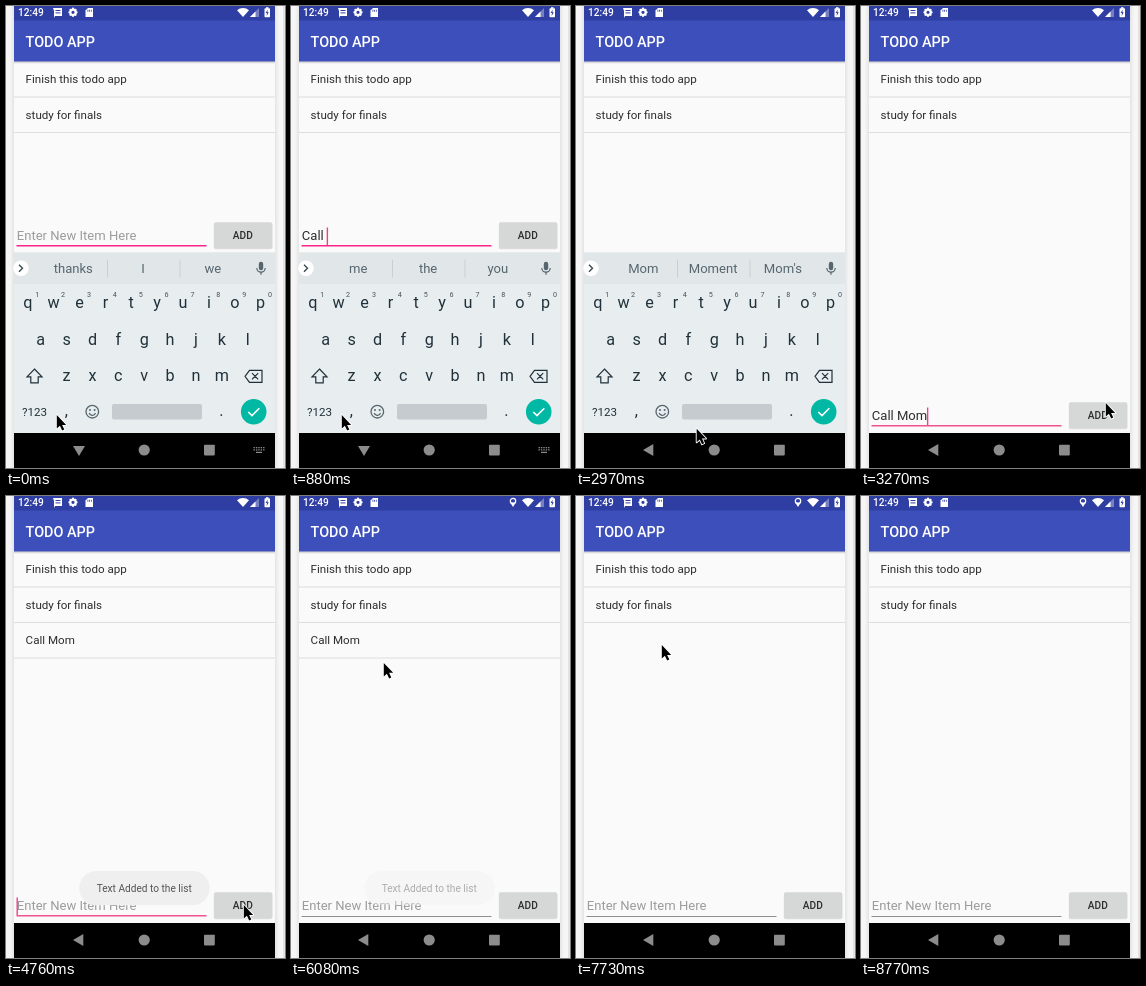
These frames come from a looping animation (279x462 px, 9.3 s). An HTML page with a canvas:

```html
<!DOCTYPE html>
<html lang="en">
<head>
<meta charset="utf-8">
<title>Todo app</title>
<style>
html, body { margin: 0; width: 100%; height: 100%; overflow: hidden; background: #f5f5f5; }
canvas { display: block; width: 279px; height: 462px; }
</style>
</head>
<body>
<canvas id="stage"></canvas>
<script>
const W = 279, H = 462, LOOP = 9300;
const LEFT = 8, WIDE = 261, MID = 138.2;
const TICK = 148.6;

// Moments in the story, in ms
const TYPE = 150, TYPE_MORE = 1330, TYPED = 1480, TO_BACK = 2080, BACK = 2820,
  HIDDEN = 3270, TO_ADD = 3720, ADD = 4460, LEAVE = 5050, RETURN = 5940,
  REST = 6080, HOLD = 7280, REMOVE = 7730, EXIT = 8020, GONE = 8770;
const PHRASE = 'Call Mom', HINT = 'Enter New Item Here';

const canvas = document.getElementById('stage');
const ratio = window.devicePixelRatio || 1;
canvas.width = W * ratio;
canvas.height = H * ratio;
const ctx = canvas.getContext('2d');
ctx.scale(ratio, ratio);

const within = (t, a, b) => t >= a && t < b;
const clamp = v => Math.min(1, Math.max(0, v));
const mix = (a, b, p) => a + (b - a) * p;
const ease = p => p * p * (3 - 2 * p);

function snap(t) {
  const k = Math.floor((t + 11) / TICK);
  return k * TICK;
}
const reached = (t, moment) => t >= moment - 15;

function rect(x, y, w, h, color, r = 0) {
  ctx.fillStyle = color;
  ctx.beginPath();
  ctx.roundRect(x, y, w, h, r);
  ctx.fill();
}
function disc(x, y, r, color) {
  ctx.fillStyle = color;
  ctx.beginPath();
  ctx.arc(x, y, r, 0, 7);
  ctx.fill();
}
function ring(x, y, r, color, width, from = 0, to = 7) {
  ctx.beginPath();
  ctx.arc(x, y, r, from, to);
  ctx.strokeStyle = color;
  ctx.lineWidth = width;
  ctx.stroke();
}
function fillPath(d, x, y, color) {
  ctx.save();
  ctx.translate(x, y);
  ctx.fillStyle = color;
  ctx.fill(new Path2D(d));
  ctx.restore();
}
function strokePath(d, x, y, color, width) {
  ctx.save();
  ctx.translate(x, y);
  ctx.strokeStyle = color;
  ctx.lineWidth = width;
  ctx.stroke(new Path2D(d));
  ctx.restore();
}
function text(str, x, y, size, color, align = 'left', weight = 400) {
  ctx.font = `${weight} ${size}px Roboto, sans-serif`;
  ctx.textAlign = align;
  ctx.fillStyle = color;
  ctx.fillText(str, x, y);
}
function fade(x0, y0, x1, y1, a, b) {
  const g = ctx.createLinearGradient(x0, y0, x1, y1);
  g.addColorStop(0, a);
  g.addColorStop(1, b);
  return g;
}

// One letter per step: the first word and its space, then the second word.
function typedText(t) {
  if (reached(t, ADD)) return '';
  if (reached(t, TYPED)) return PHRASE;
  if (reached(t, TYPE_MORE)) return PHRASE.slice(0, 7);
  return PHRASE.slice(0, Math.min(5, Math.round(t / TICK)));
}
function suggestions(t) {
  const word = typedText(t).split(' ').pop();
  if (reached(t, TYPED)) return ['Mom', 'Moment', "Mom's"];
  if (word === 'Call') return ['Call', 'Called', 'Calls'];
  if (word) return [word, word[0] === 'C' ? 'Call' : 'Mom', word[0] === 'C' ? 'Can' : 'More'];
  return reached(t, 880) ? ['me', 'the', 'you'] : ['thanks', 'I', 'we'];
}

// Blinks every half second, counted from the latest edit.
function caretOn(t) {
  if (!reached(t, TYPE) || reached(t, RETURN)) return false;
  if (!reached(t, TYPED)) return true;
  const since = [ADD, HIDDEN - 30, TYPED].find(m => reached(t, m));
  return Math.floor((t - since + 15) / 500) % 2 === 0;
}

function pointer(t) {
  const go = (from, to, a, b) => {
    const p = ease(clamp((t - a) / (b - a)));
    return [mix(from[0], to[0], p), mix(from[1], to[1], p)];
  };
  const start = [50, 408], back = [70, 432], add = [244, 396], press = [237, 408], item = [85, 148];
  if (t < BACK - 15) return go(start, back, TO_BACK, BACK - 150);
  if (t < TO_ADD) return go(back, add, BACK, HIDDEN - 20);
  if (t < LEAVE) return go(add, press, TO_ADD + 150, ADD - 150);
  if (t < 5490) return go(press, [256, 462], LEAVE, 5490);
  if (!reached(t, RETURN)) return null;
  if (t < HOLD) return go([92, 166], item, RETURN, REST - 15);
  return reached(t, GONE) ? null : go(item, [214, 462], EXIT, GONE);
}

function drawStatus(t) {
  const blue = '#2f3ea2', white = '#fff';
  rect(LEFT, 0, WIDE, 15, blue);
  text('12:49', 12, 10.3, 10.15, white, 'left', 500);
  // message
  fillPath('M0 0H9V8H2V10L1 8V3Z', 47, 2, white);
  rect(49.5, 4, 5, 1, blue);
  rect(49.5, 6.4, 5, 1, blue);
  // gear
  for (let i = 0; i < 8; i++) {
    const a = i * Math.PI / 4;
    disc(67 + 3.6 * Math.cos(a), 6.3 + 3.6 * Math.sin(a), 1.1, white);
  }
  ring(67, 6.3, 2.7, white, 2.2);
  // memory card
  fillPath('M2.5 0H7.5V9H0V2.5Z', 79.5, 2, white);
  for (let i = 0; i < 3; i++) rect(81.5 + 1.7 * i, 3.7, 0.8, 2, blue);
  // location
  if (reached(t, RETURN)) {
    ring(222, 5, 2.7, white, 1.2);
    fillPath('M-2.8 0H2.8L0 4.6Z', 222, 6.4, white);
  }
  // wifi, signal, battery
  fillPath('M0 0L-6 -6.7A9 9 0 0 1 6 -6.7Z', 237, 11, white);
  fillPath('M9 0V9H0Z', 244, 2, 'rgba(255,255,255,.35)');
  fillPath('M5.5 0V5.5H0Z', 244, 5.5, white);
  rect(258.5, 2.2, 5.5, 9, white, 0.8);
  rect(260, 1.2, 2.5, 1.5, white);
  fillPath('M2 0L0 3.6H1.4L1 6.4L3.2 2.8H1.8Z', 259.6, 3.5, blue);
}

function drawList(t) {
  const items = ['Finish this todo app', 'study for finals'];
  if (reached(t, ADD) && !reached(t, REMOVE)) items.push(PHRASE);
  if (reached(t, HOLD) && !reached(t, REMOVE)) {
    ctx.save();
    ctx.beginPath();
    ctx.rect(LEFT, 127, WIDE, 35);
    ctx.clip();
    disc(MID, 144.5, 126 + (t - HOLD + 10) / 6, '#dbdbdb');
    ctx.restore();
  }
  items.forEach((item, i) => {
    const y = 55.5 + 35.5 * i;
    text(item, 19.6, y + 21.8, 11.6, '#2c2c2c');
    rect(LEFT, y + 35, WIDE, 1, '#dedede');
  });
}

function drawEntry(t) {
  const lowered = reached(t, BACK + 150);
  const y = lowered ? 180 : 0;
  const value = typedText(t), x = 10.8, size = 13.05;
  text(value || HINT, x, 234.4 + y, size, value ? '#2c2c2c' : '#9c9c9c');

  ctx.font = `400 ${size}px Roboto, sans-serif`;
  const widthOf = s => ctx.measureText(s).width;
  const end = x + widthOf(value);
  if (!lowered) {
    const start = x + widthOf(value.slice(0, value.lastIndexOf(' ') + 1));
    rect(start, 236, end - start, 1, '#444');
  }
  if (caretOn(t)) rect(end - 0.3, 221.5 + y, 1.4, 17.5, '#f23d8a');
  if (reached(t, RETURN)) rect(10.5, 240 + y, 190, 1, '#8f8f8f');
  else rect(10.5, 239 + y, 190, 1.6, lowered ? '#f25390' : '#fb2389');

  const pressed = within(t, ADD - 160, ADD + 150);
  rect(207.8, 217.2 + y, 58.6, 26, 'rgba(0,0,0,.12)', 2);
  rect(208, 216.2 + y, 58.2, 26, pressed ? '#c9caca' : '#d6d8d7', 1.5);
  text('ADD', 236.8, 233 + y, 10.15, '#2c2c2c', 'center', 500);
}

function drawToast(t) {
  const alpha = Math.min(clamp((t - ADD) / 280), clamp((REST - t) / 300));
  if (!reached(t, ADD) || alpha <= 0.05) return;
  ctx.globalAlpha = alpha;
  rect(73.3, 375, 130.4, 34.2, '#efefef', 17.1);
  text('Text Added to the list', MID, 396, 10.15, '#555', 'center');
  ctx.globalAlpha = 1;
}

function drawKeyboard(t) {
  const ink = '#20313a', soft = '#56666e', step = 25.87;
  rect(LEFT, 246.5, WIDE, 181, '#e8edf0');
  rect(LEFT, 246.5, WIDE, 31.5, '#e1e6e9');
  disc(15, 262.3, 7.8, '#fff');
  strokePath('M0 0L3.5 3.5L0 7', 13, 258.8, '#3b4a52', 1.4);
  suggestions(t).forEach((word, i) => {
    text(word, 67.3 + 69.8 * i, 267, 13.05, soft, 'center');
    if (i) rect(28.5 + 72.5 * i, 253.5, 1, 18, '#c9d0d4');
  });
  // microphone
  rect(252.8, 255.8, 4.4, 8.4, soft, 2.2);
  ring(255, 262, 4.2, soft, 1.2, 0, Math.PI);
  rect(254.4, 266, 1.2, 2.8, soft);

  ['qwertyuiop', 'asdfghjkl', 'zxcvbnm'].forEach((keys, row) => {
    const x = MID - step * (keys.length - 1) / 2;
    [...keys].forEach((c, i) => {
      text(c, x + step * i, 302 + 36.7 * row, 16.2, ink, 'center');
      if (!row) text((i + 1) % 10, x + step * i + 9.4, 291.2, 7.2, '#44545c', 'center');
    });
  });
  // shift, backspace
  strokePath('M7.5 0L15 7.8H11.2V13.8H3.8V7.8H0Z', 21, 363, ink, 1.2);
  strokePath('M0 6L4.5 0H17V12H4.5ZM7 2.9L13.2 9.1M13.2 2.9L7 9.1', 239, 364.3, ink, 1.2);

  text('?123', 28.5, 410, 11.6, ink, 'center');
  text(',', 60.3, 410, 16.2, ink, 'center');
  ring(86.3, 405.7, 6.3, soft, 1.3);
  ring(86.3, 406, 3.3, soft, 1.2, 0.3, 2.84);
  disc(84, 404, 1, soft);
  disc(88.6, 404, 1, soft);
  rect(106, 398, 90, 15.5, '#c5cbcf', 2);
  text('.', 215.5, 410, 16.2, ink, 'center');
  disc(247.7, 405.8, 12.8, '#00b8a4');
  strokePath('M0 3.7L3.7 7.3L11 0', 242.3, 402.3, '#fff', 1.6);
}

function drawNav(t) {
  const grey = '#8c8c8c';
  rect(LEFT, 427, WIDE, 35, '#000');
  if (reached(t, BACK + 150)) {
    fillPath('M0 6L10.3 0V12Z', 67, 438, grey);
  } else {
    fillPath('M0 0H12L6 10Z', 67, 440, grey);
    for (let i = 0; i < 10; i++) {
      rect(247.5 + 2.4 * (i % 5), 441 + 2.3 * Math.floor(i / 5), 1.4, 1.3, grey);
    }
    rect(250, 445.8, 6, 1.2, grey);
  }
  disc(MID, 444, 5.6, grey);
  rect(198, 438.8, 10.8, 10.6, grey, 0.8);
}

function drawPointer(t) {
  const at = pointer(t);
  if (!at) return;
  const arrow = 'M.8 1V14.6L3.9 11.8L6.2 16.6L8.3 15.6L6.1 10.9H10.2Z';
  ctx.lineJoin = 'round';
  strokePath(arrow, ...at, '#fff', 1.8);
  ctx.lineJoin = 'miter';
  fillPath(arrow, ...at, '#000');
}

function draw(t) {
  rect(0, 0, W, H, '#f6f6f6');
  rect(4, 0, 4, H, fade(4, 0, 8, 0, '#f6f6f6', '#e4e4e4'));
  rect(269, 0, 4, H, fade(269, 0, 273, 0, '#e4e4e4', '#f6f6f6'));
  rect(277, 0, 2, H, '#e2e2e2');
  rect(LEFT, 0, WIDE, H, '#fafafa');
  drawStatus(t);
  rect(LEFT, 14.5, WIDE, 41, '#3d4fbb');
  text('TODO APP', 19.6, 40.8, 14.4, '#fff', 'left', 500);
  rect(LEFT, 55.5, WIDE, 2.5, fade(0, 55.5, 0, 58, 'rgba(0,0,0,.2)', 'rgba(0,0,0,0)'));
  drawList(t);
  drawEntry(t);
  drawToast(t);
  if (!reached(t, HIDDEN)) drawKeyboard(t);
  drawNav(t);
  drawPointer(t);
}

const start = performance.now();
function frame() {
  draw(snap((performance.now() - start) % LOOP));
  requestAnimationFrame(frame);
}
frame();
</script>
</body>
</html>
```
